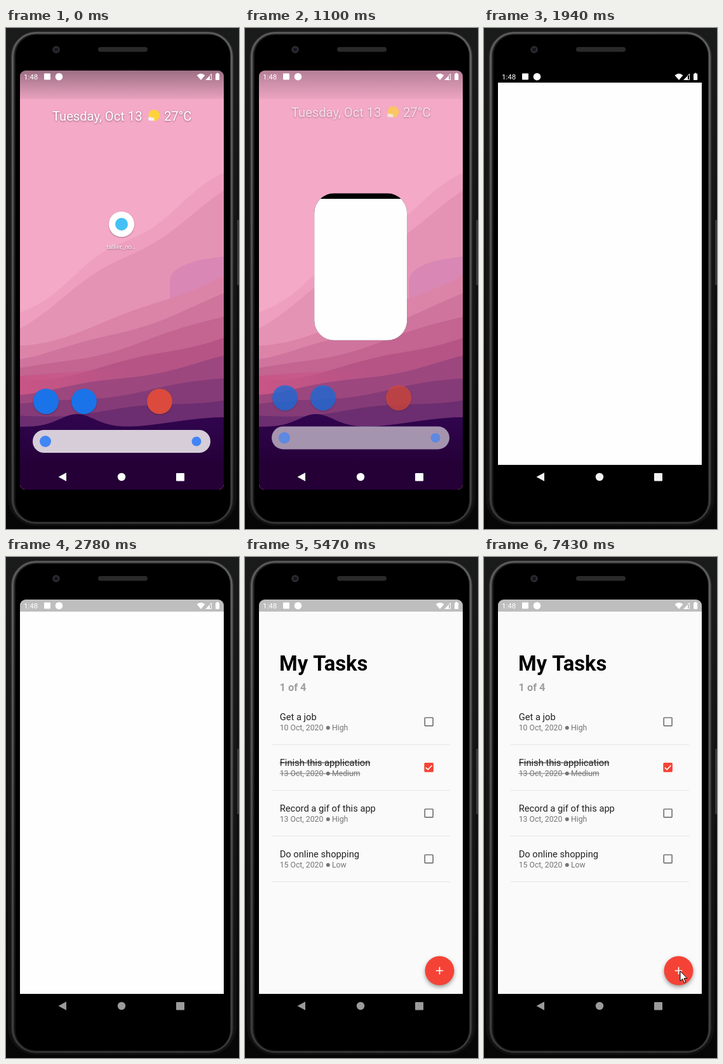
An HTML page with a canvas that plays this animation: 367 by 789 pixels, repeating every 8000 ms.

```html
<!DOCTYPE html>
<html lang="en">
<head>
<meta charset="utf-8">
<title>Task list app launch</title>
<style>
html, body { margin: 0; width: 100%; height: 100%; overflow: hidden; background: #0d0d0e; }
canvas { display: block; width: 367px; height: 789px; }
</style>
</head>
<body>
<canvas id="stage"></canvas>
<script>
const LOOP = 8000, TICK = 120, W = 367, H = 789;
const LEFT = 22, TOP = 67, WIDTH = 321, HEIGHT = 660;
const BAR = 19, BODY = 602;
const RED = '#f44336', BLUE = '#1a73e8';
const canvas = document.getElementById('stage');
const ctx = canvas.getContext('2d');
const ratio = window.devicePixelRatio || 1;
canvas.width = W * ratio;
canvas.height = H * ratio;

const OPEN_AT = 980, SPLASH_AT = 1940, LOADING_AT = 4730, LOADED_AT = 4970, TASKS_AT = 5470;
const MOVES = [
  { start: 370, end: 980, ticks: 3, from: [114, 281], to: [182, 298] },
  { start: 6220, end: 6460, ticks: 1, from: [20, 231], to: [20, 310] },
  { start: 6710, end: 6830, ticks: 1, from: [97, 703], to: [97, 703] },
  { start: 7070, end: LOOP, ticks: 3, from: [338, 713], to: [309, 652] }
];
const TASKS = [
  ['Get a job', '10 Oct, 2020', 'High'],
  ['Finish this application', '13 Oct, 2020', 'Medium', true],
  ['Record a gif of this app', '13 Oct, 2020', 'High'],
  ['Do online shopping', '15 Oct, 2020', 'Low']
];
const ARROW = new Path2D('M0 0V15.8L3.6 12.4 6.2 18.5 8.6 17.5 6 11.6H11Z');

const lerp = (a, b, p) => a + (b - a) * p;
const clamp = v => Math.min(1, Math.max(0, v));
const smooth = v => clamp(v) ** 2 * (3 - 2 * clamp(v));
const grey = v => `rgb(${v},${v},${v})`;
const mix = (a, b, p) => `rgb(${a.map((v, i) => lerp(v, b[i], p))})`;
// Motion advances in whole ticks, as in a screen recording.
const ticksSince = (t, start) => Math.max(0, Math.floor((t - start) / TICK));
const progress = (t, start, ticks) => clamp(ticksSince(t, start) / ticks);
const opening = t => 1 - Math.exp(-.431 * ticksSince(t, OPEN_AT) ** 2.43);

function rect(x, y, w, h, color, r = 0) {
  ctx.fillStyle = color;
  ctx.beginPath();
  ctx.roundRect(x, y, w, h, r);
  ctx.fill();
}
function outline(x, y, w, h, r, color, width) {
  ctx.strokeStyle = color;
  ctx.lineWidth = width;
  ctx.beginPath();
  ctx.roundRect(x, y, w, h, r);
  ctx.stroke();
}
function disc(x, y, r, color) {
  ctx.fillStyle = color;
  ctx.beginPath();
  ctx.arc(x, y, r, 0, 2 * Math.PI);
  ctx.fill();
}
function shape(d, color) {
  ctx.fillStyle = color;
  ctx.fill(new Path2D(d));
}
function line(d, color, width) {
  ctx.strokeStyle = color;
  ctx.lineWidth = width;
  ctx.stroke(new Path2D(d));
}
function gradient(x0, y0, x1, y1, first, last) {
  const fill = ctx.createLinearGradient(x0, y0, x1, y1);
  fill.addColorStop(0, first);
  fill.addColorStop(1, last);
  return fill;
}
function text(str, x, y, size, color, weight = 400, align = 'left') {
  ctx.font = `${weight} ${size}px Roboto, sans-serif`;
  ctx.textAlign = align;
  ctx.fillStyle = color;
  ctx.fillText(str, x, y);
}
function withShadow(color, blur, dy, draw) {
  ctx.save();
  ctx.shadowColor = color;
  ctx.shadowBlur = blur * ratio;
  ctx.shadowOffsetY = dy * ratio;
  draw();
  ctx.restore();
}
function clipped(x, y, w, h, r, draw) {
  ctx.save();
  ctx.beginPath();
  ctx.roundRect(x, y, w, h, r);
  ctx.clip();
  draw();
  ctx.restore();
}

function drawPhone() {
  rect(0, 0, W, H, gradient(0, 0, 0, H, '#1a1b1b', '#060606'));
  rect(364, 302, 3, 103, '#3a3a3c', 1);
  // Nested rings shade the metal edge from its rim to the glass.
  for (let i = 0; i < 12; i++) {
    const light = 26 + 80 * Math.exp(-(((i - 7) / 2) ** 2));
    const inset = 3 + i, top = 2 + i * .75;
    rect(inset, top, W - 1 - 2 * inset, 784 - i * .6 - top, gradient(0, 0, 0, H, grey(light), grey(light * .6)), 44 - i);
  }
  rect(15, 11, 338, 766, '#000', 32);
  disc(79, 34, 5.8, '#2b2b30');
  disc(79, 34, 3, '#15151e');
  rect(145, 30, 78, 7.5, '#2a2a2b', 3.7);
}

// Fills everything below a ridge; u runs from 0 to 1 across the screen.
function land(color, height) {
  ctx.fillStyle = color;
  ctx.beginPath();
  for (let x = 0; x <= WIDTH; x += 3) ctx.lineTo(LEFT + x, height(x / WIDTH));
  ctx.lineTo(LEFT + WIDTH, TOP + HEIGHT);
  ctx.lineTo(LEFT, TOP + HEIGHT);
  ctx.fill();
}
function drawWallpaper() {
  rect(LEFT, TOP, WIDTH, HEIGHT, '#f4a9c7');
  land('#ee9fbf', u => lerp(448, 232, u) + 7 * Math.sin(u * 12));
  land('#e593b5', u => lerp(468, 262, u) + 6 * Math.sin(u * 10 + 1));
  shape('M343 360Q258 368 258 400V425H343Z', '#d988b5');
  const bands = 7, pink = [220, 132, 168], rose = [182, 84, 134], plum = [108, 46, 112];
  for (let i = 0; i < bands; i++) {
    const p = i / (bands - 1);
    const color = p < .5 ? mix(pink, rose, p * 2) : mix(rose, plum, p * 2 - 1);
    land(color, u => lerp(lerp(500, 612, p), lerp(388, 584, p), u ** 1.3) + 3 * Math.sin(u * 9 + i * 2));
    if (i === 3) land(gradient(LEFT, 0, 200, 0, '#c85586', 'rgba(200,85,134,0)'), u => 548 - 25 * u);
  }
  land(gradient(0, 610, 0, 690, '#310550', '#240036'), u =>
    628 - 20 * Math.exp(-(((u - .28) / .12) ** 2)) - 15 * smooth((u - .5) / .5));
}

function drawHome(t) {
  const opened = opening(t);
  drawWallpaper();
  ctx.save();
  ctx.globalAlpha = 1 - opened ** 1.2;
  rect(LEFT, TOP, WIDTH, 45, gradient(0, TOP, 0, 112, 'rgba(50,40,50,.45)', 'rgba(50,40,50,.06)'));
  ctx.translate(0, -16 * opened);
  withShadow('rgba(60,20,50,.55)', 3, 1, () => {
    text('Tuesday, Oct 13', 73, 146, 20.15, '#fff');
    text('27°C', 249, 146, 20.15, '#fff');
  });
  disc(233.5, 137.5, 9, '#fdd23c');
  disc(227, 143, 3, '#f3eef3');
  disc(231, 143.5, 2.6, '#f3eef3');

  if (t < OPEN_AT) {
    withShadow('rgba(0,0,0,.3)', 2, 1, () => disc(182, 309, 20, '#fff'));
    disc(182, 309, 10, '#45c0f5');
    withShadow('rgba(60,20,50,.6)', 2, 1, () => text('tallier_no...', 182, 348, 9.8, '#fff', 400, 'center'));
  }
  for (const [x, color] of [[63, BLUE], [123, BLUE], [242, '#db4a3c']])
    withShadow('rgba(0,0,0,.3)', 2, 1, () => disc(x, 588, 20, color));
  rect(42, 633, 280, 36, '#d6cdd9', 18);
  disc(62, 651, 9, '#4285f4');
  disc(300, 651, 7.5, '#4285f4');
  ctx.restore();
}

// The app surface grows out of its icon, cropped by a rounded window.
function drawOpening(t) {
  const v = opening(t);
  const w = lerp(52, WIDTH, v), h = lerp(54, HEIGHT, v ** 1.17);
  const x = lerp(156, LEFT, v), y = lerp(310, TOP + HEIGHT / 2, 1 - (1 - v) ** 3.3) - h / 2;
  const scale = w / WIDTH;
  clipped(x, y, w, h, Math.min(w / 2, 44 * (1 - v) ** .8), () => {
    rect(x, y, w, h, '#000');
    rect(x, y + BAR * scale, w, BODY * scale, '#fefefe');
  });
}

function drawTask([title, date, priority, done], i) {
  const y = 257 + 72 * i, left = 54.7, right = 137;
  text(title, left, y, 14.7, '#212121');
  const titleWidth = ctx.measureText(title).width;
  text(date, left, y + 16, 12.26, '#757575');
  disc(130.8, y + 12, 3, '#757575');
  text(priority, right, y + 16, 12.26, '#757575');
  const end = right + ctx.measureText(priority).width;
  rect(42, y + 38, 281, 1, '#e6e6e6');
  if (done) {
    rect(left, y - 5.5, titleWidth, 1, '#212121');
    rect(left, y + 11.5, end - left, 1, '#757575');
    rect(282.3, y - 4.9, 14.6, 14.6, RED, 1.6);
    line(`M284.8 ${y + 2.6}l3.3 3.3 6.4-6.6`, '#fff', 1.6);
  } else {
    outline(283.2, y - 4, 12.9, 12.9, .8, '#757575', 1.7);
  }
}

function drawSpinner(step) {
  const radians = Math.PI / 180;
  ctx.strokeStyle = RED;
  ctx.lineWidth = 3.2;
  ctx.beginPath();
  ctx.arc(182.5, 377, 13.5, (15 * step - 95) * radians, (200 * step - 60) * radians);
  ctx.stroke();
}

function drawTasksScreen(t) {
  rect(LEFT, TOP + BAR, WIDTH, BODY, '#fafafa');
  if (t < LOADED_AT) drawSpinner(ticksSince(t, LOADING_AT));
  if (t >= TASKS_AT) {
    text('My Tasks', 54, 179, 32.7, '#000', 700);
    text('1 of 4', 54.5, 211, 16.35, '#9e9e9e', 600);
    TASKS.forEach(drawTask);
  }
  withShadow('rgba(0,0,0,.38)', 6, 3, () => disc(306.5, 651.5, 23, RED));
  line('M300.8 651.5h11.4M306.5 645.8v11.4', '#fff', 1.7);
}

function drawStatusIcons() {
  text('1:48', 28, 81, 11.6, '#fff');
  rect(60, 71.5, 10, 10, '#fff', 1);
  disc(83.5, 76.7, 5.8, '#fff');
  shape('M300.6 74.4Q307 69 313.4 74.4L307 82Z', '#fff');
  shape('M314 82L321 75V82Z', '#fff');
  line('M320.5 75.3L323.6 72.3V81.5H320', '#fff', 1);
  rect(330, 72, 6.2, 10, '#fff', 1);
  rect(331.7, 70.8, 2.8, 2, '#fff');
}

function drawNavIcons(color) {
  shape('M82.5 707L95 700.3V713.7Z', color);
  disc(182, 707, 6.2, color);
  rect(268, 701, 13, 12.5, color, 1);
}

function drawCursor(t) {
  const move = MOVES.find(({ start, end }) => t >= start && t < end);
  if (!move) return;
  const p = progress(t, move.start, move.ticks);
  ctx.save();
  ctx.translate(...move.from.map((v, i) => lerp(v, move.to[i], p)));
  ctx.fillStyle = '#fff';
  ctx.fill(ARROW);
  ctx.strokeStyle = '#000';
  ctx.lineWidth = 1;
  ctx.stroke(ARROW);
  ctx.restore();
}

function render(t) {
  ctx.setTransform(ratio, 0, 0, ratio, 0, 0);
  drawPhone();
  clipped(LEFT, TOP, WIDTH, HEIGHT, 9, () => {
    if (t < SPLASH_AT) drawHome(t);
    if (t >= OPEN_AT) drawOpening(t);
    if (t >= SPLASH_AT) rect(LEFT, TOP, WIDTH, BAR, grey(lerp(0, 190, progress(t, SPLASH_AT, 3))));
    if (t >= LOADING_AT) drawTasksScreen(t);
    drawStatusIcons();
    drawNavIcons(grey(lerp(255, 155, progress(t, SPLASH_AT - TICK, 8))));
  });
  drawCursor(t);
}

const start = performance.now();
function frame() {
  render((performance.now() - start) % LOOP);
  requestAnimationFrame(frame);
}
frame();
</script>
</body>
</html>
```
